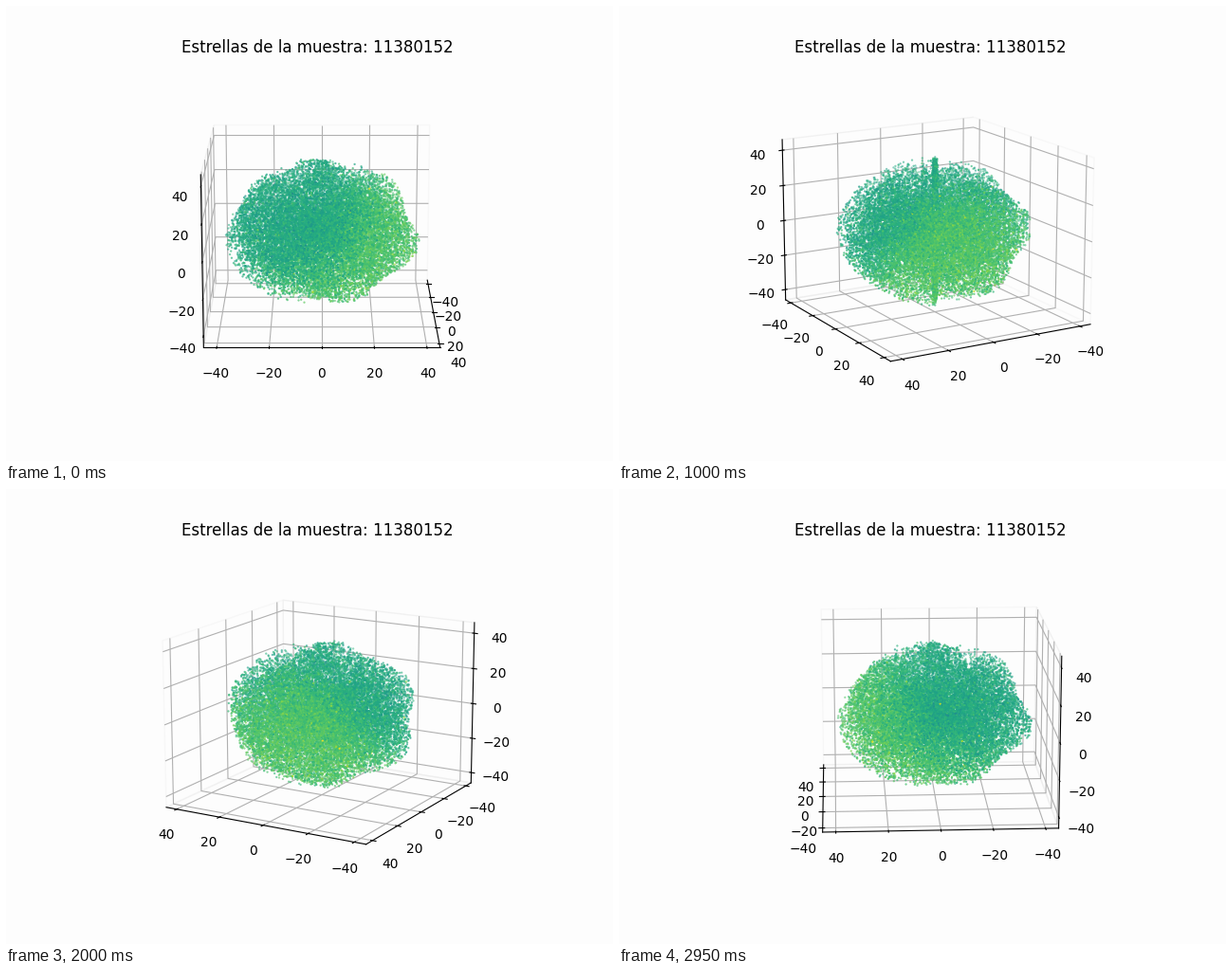
Recreate the animation shown at these times as a matplotlib script. Size 640 by 480 pixels, loop 3 s.

```python
import numpy as np
import matplotlib.pyplot as plt
from matplotlib.animation import FuncAnimation

FRAMES, INTERVAL = 60, 50
STEP = 3          # degrees of azimuth per frame
RADIUS = 39.5
SHEET = np.radians(60)
PAPER = "#fdfdfd"


def star_cloud(count, rng):
    """Lobed ball of stars, thinned at the poles except on one upright sheet."""
    lon = rng.uniform(0, 2 * np.pi, count)
    sin_lat = rng.uniform(-1, 1, count)
    cos_lat = np.sqrt(1 - sin_lat ** 2)
    unit = np.array([cos_lat * np.cos(lon), cos_lat * np.sin(lon), sin_lat])
    reach = RADIUS * (1 - 0.06 * (1 + np.sin(4 * lon + 5 * sin_lat)))
    pos = unit * reach * rng.random(count) ** 0.45

    across = pos[1] * np.cos(SHEET) - pos[0] * np.sin(SHEET)
    polar = np.abs(sin_lat) > 0.85
    keep = ~polar | (np.abs(across) < 1) | (rng.random(count) < 0.5)
    return pos[:, keep], unit[:, keep]


def polar_sheet(count, rng):
    """Thin vertical fan of stars reaching both poles."""
    tilt = rng.normal(0, 0.16, count)
    side = rng.choice([-1, 1], count)
    unit = np.array([np.sin(tilt) * np.cos(SHEET),
                     np.sin(tilt) * np.sin(SHEET),
                     side * np.cos(tilt)])
    pos = unit * RADIUS * rng.uniform(0.6, 1, count)
    pos[:2] += rng.normal(0, 0.5, (2, count))
    return pos, unit


def shade(unit, rng):
    """Teal above, behind and along x; lime below and towards +y."""
    x, y, z = unit
    teal = 0.6 * x ** 2 - 0.75 * y + 0.65 * z - 0.15
    value = 0.665 - 0.06 * np.tanh(2.5 * teal)
    value += rng.normal(0, 0.042, x.size)
    value[rng.random(x.size) < 0.002] += 0.22
    return value


rng = np.random.default_rng(11)
parts = [star_cloud(23000, rng), polar_sheet(600, rng)]
pos, unit = (np.hstack(group) for group in zip(*parts))

fig = plt.figure(figsize=(6.4, 4.8), dpi=100, facecolor=PAPER)
ax = fig.add_subplot(projection="3d", facecolor=PAPER)
ax.set_title("Estrellas de la muestra: 11380152")
ax.scatter(*pos, c=shade(unit, rng), cmap="viridis", vmin=0, vmax=1,
           s=2.7, linewidths=0)
ax.set(xlim=(-45, 45), ylim=(-45, 45), zlim=(-46, 46))
for axis in (ax.xaxis, ax.yaxis, ax.zaxis):
    axis.set_ticks(range(-40, 41, 20))
    axis.pane.fill = False


def turn(i):
    ax.view_init(elev=15, azim=STEP * i)
    return []


anim = FuncAnimation(fig, turn, frames=FRAMES, init_func=lambda: turn(0),
                     interval=INTERVAL, repeat=True, repeat_delay=0)
plt.show()
```
